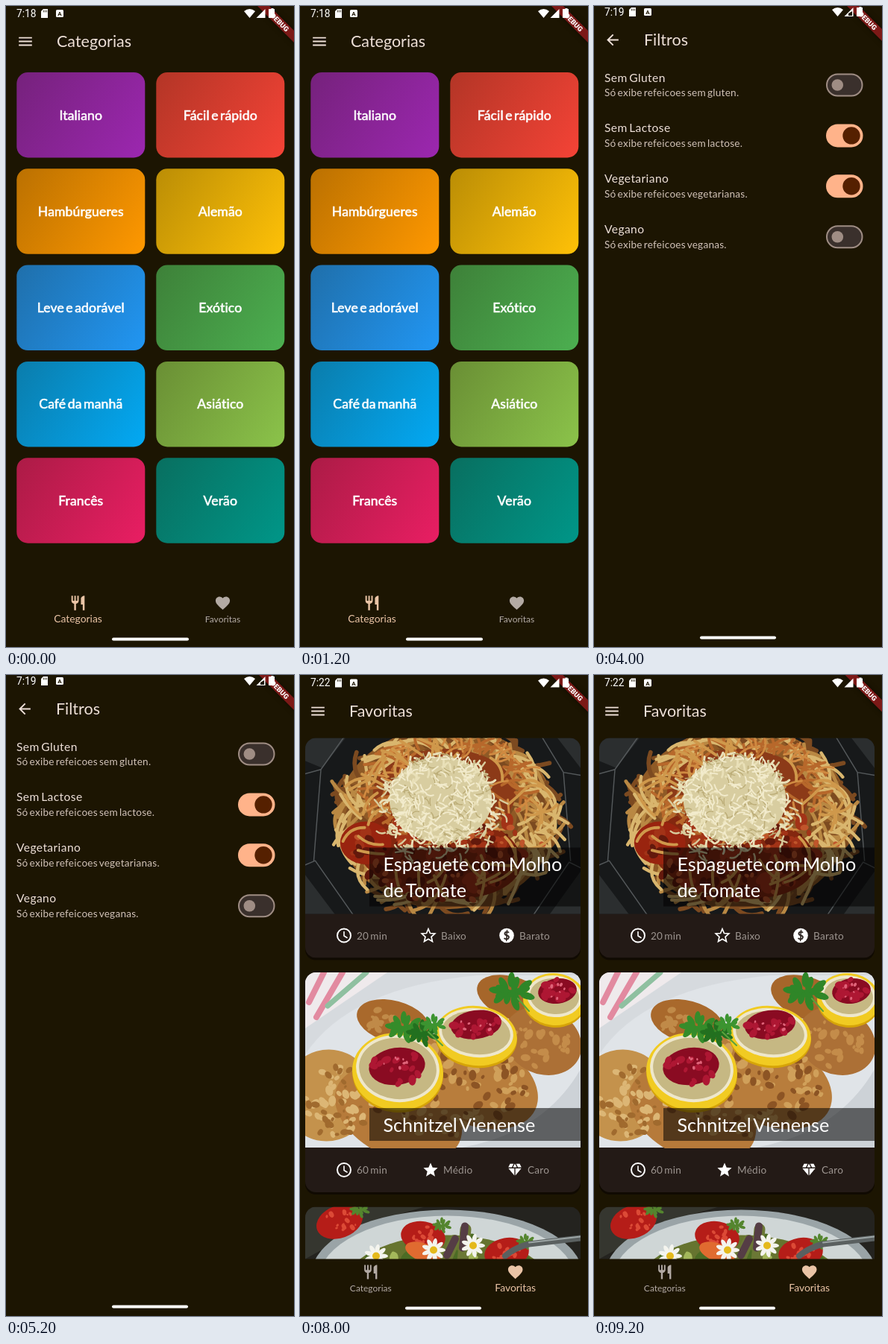
These frames come from a looping animation (386 by 860 pixels, 10 s). An HTML page:

```html
<!DOCTYPE html>
<html lang="pt">
<head>
<meta charset="utf-8">
<title>Receitas</title>
<style>
html, body { margin: 0; width: 100%; height: 100%; overflow: hidden; background: #1c1502; }
svg { display: block; }
#stage { width: 386px; height: 860px; font-family: Lato, sans-serif; }
#stage text { word-spacing: -.12em; }
.banner { filter: drop-shadow(0 0 3px rgba(0, 0, 0, .5)); }
.screen { visibility: hidden; animation: turn 10s step-end infinite; }
@keyframes turn {
  0% { visibility: visible; }
  20%, 100% { visibility: hidden; }
}
</style>
</head>
<body>
<svg id="stage" viewBox="0 0 386 860"></svg>
<script>
const BG = '#1c1502', INK = '#eee0d8', PEACH = '#ffb48e', GREY = '#9d9590';

const ICON = {
  menu: 'M3 18h18v-2H3zM3 13h18v-2H3zM3 6v2h18V6z',
  back: 'M20 11H7.8l5.6-5.6L12 4l-8 8 8 8 1.4-1.4L7.8 13H20z',
  food: 'M11 9H9V2H7v7H5V2H3v7c0 2.1 1.7 3.8 3.75 4v9h2.5v-9C11.3 12.8 13 11.1 13 9V2h-2zM16 6v8h2.5v8H21V2c-2.8 0-5 2.2-5 4z',
  heart: 'M12 21.35l-1.45-1.3C5.4 15.4 2 12.3 2 8.5 2 5.4 4.4 3 7.5 3c1.7 0 3.4.8 4.5 2.1C13.1 3.8 14.8 3 16.5 3 19.6 3 22 5.4 22 8.5c0 3.8-3.4 6.9-8.55 11.5z',
  star: 'M12 17.3 18.2 21l-1.65-7L22 9.2l-7.2-.6L12 2 9.2 8.6 2 9.2 7.45 14 5.8 21z',
  gem: 'M12.16 3h-.32L9.2 8.25h5.6zM16.46 8.25h5.16L19 3h-5.16zM21.4 9.75h-8.65V20.1zM11.25 20.1V9.75H2.6zM7.54 8.25 10.16 3H5L2.38 8.25z'
};

// Small drawing helpers
function text(x, y, s, size, fill = INK, { ls = 0, mid, bold, more = '' } = {}) {
  const heavy = bold ? ` stroke="${fill}" stroke-width=".6"` : '';
  return `<text x="${x}" y="${y}" font-size="${size}" fill="${fill}" style="letter-spacing:${ls}px"${mid ? ' text-anchor="middle"' : ''}${heavy} ${more}>${s}</text>`;
}
const rect = (x, y, w, h, fill, r = 0) =>
  `<rect x="${x}" y="${y}" width="${w}" height="${h}" rx="${r}" fill="${fill}"/>`;
const oval = (x, y, rx, ry, fill, turn = 0) =>
  `<ellipse rx="${rx}" ry="${ry}" fill="${fill}" transform="translate(${x} ${y}) rotate(${turn})"/>`;
const path = (d, fill) => `<path d="${d}" fill="${fill}"/>`;
const line = (d, color, w) =>
  `<path d="${d}" fill="none" stroke="${color}" stroke-width="${w}" stroke-linecap="round" stroke-linejoin="round"/>`;
const at = (x, y, body, more = '') => `<g transform="translate(${x} ${y})" ${more}>${body}</g>`;
const icon = (name, x, y, fill = INK, size = 24) =>
  at(x, y, `<path d="${ICON[name]}" fill="${fill}" transform="scale(${size / 24}) translate(-12 -12)"/>`);
const repeat = (n, f) => Array.from({ length: n }, (_, i) => f(i)).join('');

function random(seed) {
  return () => (seed = (seed * 16807) % 2147483647) / 2147483647;
}

// Scatter short bent strands inside an elliptical ring
function strands(rnd, n, cx, cy, rx, ry, inner, len, color, w, spread = 1.8) {
  const d = repeat(n, () => {
    const a = rnd() * 6.283, r = inner + (1 - inner) * Math.sqrt(rnd());
    const x = cx + rx * r * Math.cos(a), y = cy + ry * r * Math.sin(a);
    const b = a + 1.57 + (rnd() - .5) * spread, dx = len * Math.cos(b), dy = len * Math.sin(b);
    const k = rnd() * .8;
    return `M${(x - dx).toFixed(1)} ${(y - dy).toFixed(1)}Q${(x + dy * k).toFixed(1)} ${(y - dx * k).toFixed(1)} ${(x + dx).toFixed(1)} ${(y + dy).toFixed(1)}`;
  });
  return line(d, color, w);
}
function specks(rnd, n, cx, cy, rx, ry, size, fill) {
  return repeat(n, () => {
    const a = rnd() * 6.283, r = Math.sqrt(rnd()), s = size * (.5 + rnd());
    return oval(cx + rx * r * Math.cos(a), cy + ry * r * Math.sin(a), s, s * .7, fill, rnd() * 180);
  });
}

// Dishes
function pasta() {
  const rnd = random(41);
  return rect(0, 0, 386, 283, '#17191a') +
    path('M0 0H70L24 60 0 50zM386 60 340 0H386zM0 210 55 283H0zM386 205 330 283H386z', '#2b2e2f') +
    line('M0 68 22 62 66 0M22 62 12 190M0 196 14 190 70 270M386 70 362 66 322 0M362 66 372 190M386 200 370 192 316 272', '#54585a', 1.5) +
    oval(198, 130, 154, 128, '#8f5a26') +
    strands(rnd, 90, 198, 130, 156, 128, .55, 22, '#7c4a20', 6, 2.6) +
    strands(rnd, 90, 198, 130, 150, 126, .5, 24, '#b98843', 5, 2.6) +
    strands(rnd, 85, 198, 130, 156, 130, .6, 22, '#d9b66e', 4.5, 2.4) +
    oval(188, 180, 116, 62, '#84270f', 8) + oval(195, 95, 100, 62, '#8c3a18') +
    strands(rnd, 70, 198, 85, 120, 75, .5, 16, '#b7682b', 4, 4) +
    strands(rnd, 40, 198, 85, 125, 75, .5, 14, '#d08a41', 3, 4) +
    oval(85, 165, 36, 30, '#99240f') +
    specks(rnd, 70, 188, 175, 130, 70, 8, '#a23317') +
    specks(rnd, 75, 188, 182, 120, 68, 6, '#63190c') +
    specks(rnd, 45, 200, 172, 140, 75, 4, '#c0552b') +
    strands(rnd, 45, 198, 130, 140, 110, .6, 18, '#cf984b', 4, 3) +
    strands(rnd, 70, 190, 118, 92, 80, .5, 6, '#d8cb9c', 2.5, 6.3) +
    oval(190, 104, 72, 60, '#d8cda0') +
    strands(rnd, 110, 190, 108, 82, 70, .3, 5, '#e9e0b8', 3, 6.3) +
    strands(rnd, 100, 190, 106, 76, 66, 0, 5, '#bcad78', 1.5, 6.3) +
    strands(rnd, 170, 190, 103, 74, 62, 0, 5, '#f2ebcc', 2, 6.3);
}

// A sprig of small pointed leaves
function parsley(x, y, s, fill = '#2f7a2c') {
  return repeat(14, i => {
    const r = s * (.3 + .4 * (i % 3) / 2), a = i * 2.4;
    return oval(x + r * Math.cos(a), y + r * .65 * Math.sin(a), s * .28, s * .13, fill, i * 137);
  });
}

function toast() {
  const rnd = random(9);
  const berries = [[108,84],[135,83],[144,88],[170,90],[188,70],[190,94],[222,51],[222,75],[222,95],[249,86],[264,57],[282,38],[294,69],[312,64],[275,80],[207,92],[246,50]];
  return rect(0, 0, 369, 235, '#e6e4e8') + path('M0 0H260L0 62z', '#dddad2') +
    path('M205 110Q270 190 369 150V185Q290 190 210 150z', '#c58a7c') +
    path('M225 150Q300 190 369 168V184Q290 194 225 165z', '#d8b36b') +
    oval(295, 92, 106, 72, '#e6d198', -8) + oval(298, 76, 96, 62, '#f1e4b9', -8) +
    oval(310, 65, 56, 36, '#f6edcd', -8) +
    path('M-10 150Q20 90 95 82Q190 80 240 155Q260 235 220 240H-10z', '#e4cd8c') +
    path('M-10 140Q30 85 110 84Q190 85 228 150Q230 200 170 210Q60 235 -10 195z', '#f1e5ba') +
    oval(100, 125, 55, 26, '#eed38a', 5) + oval(102, 123, 34, 15, '#f5e4a9', 5) +
    specks(rnd, 13, 160, 120, 60, 28, 7, '#e4c172') + specks(rnd, 9, 60, 190, 70, 24, 7, '#dfc684') +
    specks(rnd, 8, 320, 40, 40, 26, 5, '#e9d08a') +
    parsley(65, 68, 36, '#23541f') + parsley(96, 62, 34, '#2f6b25') + parsley(120, 46, 32, '#2a6222') + parsley(138, 62, 28, '#1d4a1c') +
    line('M105 72Q180 84 225 66T310 36', '#97a33c', 3) +
    berries.map(([x, y]) => oval(x, y, 15, 15, '#6d0713') + oval(x - 1, y - 1, 12.5, 12.5, '#980f1f') + oval(x - 4, y - 5, 3, 3, '#d2606a')).join('');
}

function burger() {
  const rnd = random(23);
  return rect(0, 0, 369, 235, '#ccd0d6') +
    path('M8 110C0 50 60 10 130 3C190 5 215 45 206 100L120 150H20z', '#c98750') +
    path('M14 80C30 35 70 12 125 8C180 10 200 40 198 72C130 60 50 70 14 100z', '#dda268') +
    path('M208 75C205 30 240 -15 300 -15C350 -15 372 20 369 70V120Q280 150 210 100z', '#d1925c') +
    path('M220 58C225 20 260 -12 300 -12C340 -10 362 15 362 50Q290 20 220 58z', '#e0a66f') +
    path('M12 118Q95 68 190 75L240 90 369 112V160H12z', '#4d1b16') +
    oval(60, 128, 62, 16, '#dcbd92', -20) + oval(318, 125, 58, 14, '#c08a58', 12) +
    specks(rnd, 28, 185, 115, 115, 40, 13, '#82281f') + specks(rnd, 35, 180, 115, 115, 38, 10, '#231010') +
    specks(rnd, 22, 200, 125, 105, 28, 6, '#b0604a') +
    path('M70 122Q90 78 125 76L118 98Q92 105 80 128z', '#6f8f35') + line('M82 115Q100 90 120 84', '#344c18', 4) +
    oval(190, 96, 28, 28, '#34481a') + oval(190, 95, 22, 21, '#99a64f') + oval(190, 94, 14, 12, '#5d5028') +
    specks(rnd, 7, 190, 95, 10, 9, 3, '#d8cd8e');
}

function schnitzel() {
  const rnd = random(77);
  const slice = (x, y, rx, ry, jx, jy) =>
    oval(x, y + 3, rx, ry, '#d6a408', 6) + oval(x, y, rx, ry, '#f1cb22', 6) + oval(x, y - 4, rx - 5, ry - 7, '#eee7cb', 6) +
    oval(x, y - 4, rx - 9, ry - 11, '#c6b883', 6) +
    oval(jx, jy, rx * .62, ry * .48, '#8a0b22', -8) + specks(rnd, 14, jx, jy, rx * .55, ry * .45, 6, '#ae1733') + specks(rnd, 8, jx, jy, rx * .4, ry * .3, 2, '#e0647a');
  return rect(0, 0, 369, 235, '#d6dade') + path('M0 0H110L0 75z', '#efeaec') +
    line('M25 0 5 40M50 0 15 60', '#e28aa0', 8) + line('M82 0 30 45', '#8fc0a0', 7) +
    path('M0 110Q60 20 230 4H369V235H0z', '#e0e4e8') +
    oval(30, 165, 60, 62, '#c4924c', 30) + oval(118, 66, 50, 28, '#a9692c', 15) + oval(125, 190, 90, 58, '#b67a3a', 25) +
    oval(225, 145, 92, 58, '#b87d3c', 25) + oval(280, 35, 52, 28, '#a6662a', 20) + oval(318, 92, 54, 44, '#ac7036', 25) +
    specks(rnd, 60, 190, 150, 110, 70, 6, '#d0a05a') + specks(rnd, 60, 190, 155, 105, 65, 5, '#8c5424') +
    specks(rnd, 35, 45, 175, 45, 48, 5, '#dcb675') + specks(rnd, 25, 45, 175, 45, 48, 4, '#a06a2e') +
    specks(rnd, 25, 318, 95, 44, 34, 5, '#c48c4a') + specks(rnd, 15, 110, 64, 36, 18, 5, '#c08a48') +
    path('M210 235Q320 215 369 130V235z', '#cdd2d7') +
    slice(334, 36, 42, 35, 338, 25) + slice(229, 85, 55, 40, 229, 70) + slice(124, 133, 61, 52, 123, 126) +
    parsley(130, 74, 30, '#358c2a') + parsley(155, 82, 26, '#22701f') + parsley(170, 70, 20, '#3c9430') + parsley(274, 26, 36, '#2f8628') +
    line('M165 80 184 98M285 35 300 52', '#5ba33c', 2);
}

function salad() {
  const rnd = random(58);
  const daisy = (x, y) => repeat(9, i => oval(x + 9 * Math.cos(i * .7), y + 9 * Math.sin(i * .7), 7, 3, '#f4f4ee', i * 40)) + oval(x, y, 5, 5, '#e4b91c');
  const berry = (x, y, s, turn) => oval(x, y, s, s * .68, '#b51d18', turn) + specks(rnd, 14, x, y, s * .7, s * .45, 3, '#dc4a36') + parsley(x + s * .8, y - s * .5, s * .5, '#54852e');
  return rect(0, 0, 369, 235, '#24231f') + path('M0 0H160L90 20 0 70z', '#35362f') +
    oval(190, 92, 182, 88, '#9aa4a7') + oval(190, 98, 172, 86, '#cfd6d6') + oval(190, 110, 140, 72, '#66742f') +
    specks(rnd, 45, 190, 85, 125, 40, 9, '#4c6c25') + specks(rnd, 32, 190, 80, 120, 32, 6, '#a4b85b') +
    berry(46, 20, 32, -20) + berry(158, 40, 30, 10) + berry(270, 62, 30, -10) + oval(158, 61, 25, 12, '#e06b30', 20) +
    line('M210 85 215 30M185 80 200 45', '#6b7835', 15) + line('M211 55 214 26M190 65 201 43', '#553d45', 10) +
    daisy(95, 66) + daisy(172, 58) + daisy(225, 52) +
    line('M369 42 300 50Q280 55 268 66', '#5a6060', 8) + line('M369 40 300 48', '#9ca5a5', 2);
}

// Shared screen parts
function status(time, y, weak) {
  const roboto = 'font-family="Roboto, sans-serif"';
  return at(0, y - 8, path('M331-8H347L396 41V57z', '#7c1917') +
      text(0, 3.4, 'DEBUG', 9.4, '#fff', { mid: 1, more: roboto + ' font-weight="900" transform="translate(367 20) rotate(45)"' }), 'class="banner"') +
    text(14, y + 4.8, time, 13.8, '#fff', { more: roboto }) +
    at(0, y, path('M50-6H56V6H47V-3z', '#fff') + line('M50.5-4v2M52.5-4v2M54.5-4v2', BG, .8) +
      rect(67, -5, 10, 10, '#fff', 1.5) +
      text(72, 3, 'A', 8, BG, { mid: 1, more: roboto + ' font-weight="700"' }) +
      path('M319-3Q326.5-9 334-3L326.5 6z', '#fff') + path('M347.5-6V6H335.5z', '#fff') +
      (weak ? path('M346-1V5H341V2z', BG) : '') +
      path('M354-6H355.5V-7H358.5V-6H360V6H352V-6z', '#fff'));
}
const head = (ic, x, y, title, size = 21.5) => icon(ic, x, y, INK, 23.5) + text(x + 42, y + 7.5, title, size);
const pill = (x, y, w, fill = '#fff') => rect(x, y - 2, w, 4, fill, 2);

function nav(x1, x2, on) {
  const tab = (name, label, x, lit) => icon(name, x, 801, lit ? '#eac4a6' : '#b3aaa4', lit ? 23.5 : 23) +
    text(x, 827, label, lit ? 13.9 : 12, lit ? '#eac4a6' : '#b3aaa4', { mid: 1 });
  return tab('food', 'Categorias', x1, on === 0) + tab('heart', 'Favoritas', x2, on === 1);
}

const clock = at(52, 265, '<circle r="9" fill="none" stroke="#fff" stroke-width="2"/>' + line('M0-5V.5L4 3', '#fff', 1.6));
const coin = at(270, 265, '<circle r="9.8" fill="#fff"/>' + text(0, 5, '$', 14.5, '#231a16', { mid: 1, bold: 1 }));

function meal(x, y, photo, lines, facts, hard) {
  const top = lines.length > 1 ? 147 : 182;
  const label = (s, tx) => text(tx, 270, s, 13.6, GREY, { ls: .24 });
  const body = rect(0, 0, 369, 295, '#231a16') +
    `<svg width="369" height="236" overflow="hidden">${photo}</svg>` +
    (lines.length ? rect(86, top, 283, 226 - top, 'rgba(0,0,0,.54)') : '') +
    lines.map((s, i) => text(104.5, 213.5 - 35 * (lines.length - 1 - i), s, 25.2, '#fff')).join('') +
    (facts ? clock + label(facts[0], 69) +
      (hard ? icon('star', 168, 265, '#fff', 23) + icon('gem', 281, 265, '#fff', 22)
            : at(165, 265, `<path d="${ICON.star}" transform="scale(.88) translate(-12 -12)" fill="none" stroke="#fff" stroke-width="1.9"/>`) + coin) +
      label(facts[1], hard ? 185 : 182) + label(facts[2], hard ? 298 : 287) : '');
  return rect(x, y + 3, 369, 295, '#100a02', 14) + at(x, y, body, 'clip-path="url(#card)"');
}

// Screens
const tiles = [['Italiano', '9c27b0'], ['Fácil e rápido', 'f44336'], ['Hambúrgueres', 'ff9800'], ['Alemão', 'ffc107'],
  ['Leve e adorável', '2196f3'], ['Exótico', '4caf50'], ['Café da manhã', '03a9f4'], ['Asiático', '8bc34a'],
  ['Francês', 'e91e63'], ['Verão', '009688']];

const fade = tiles.map(([, c], i) =>
  `<linearGradient id="g${i}" gradientUnits="userSpaceOnUse" x2="172" y2="114.5"><stop stop-color="#${c}" stop-opacity=".7"/><stop offset="1" stop-color="#${c}"/></linearGradient>`).join('');

const home = () => status('7:18', 10) + head('menu', 26, 47.5, 'Categorias') +
  tiles.map(([name], i) => at(14.3 + i % 2 * 187, 89 + (i >> 1) * 129.3,
    rect(0, 0, 172, 114.5, `url(#g${i})`, 15) + text(86, 63.5, name, 17.6, '#fff', { ls: .12, mid: 1, bold: 1 }))).join('') +
  nav(96.5, 290.5, 0) + pill(142, 849.5, 103);

const dish = '<use href="#pasta" transform="translate(0 -17) scale(.956)"/>';
const spaghetti = (x, y) => meal(x, y, dish, ['Espaguete com Molho', 'de Tomate'], ['20 min', 'Baixo', 'Barato']);

const quick = () => status('7:19', 8, true) + head('back', 25, 45.5, 'Fácil e rápido') + spaghetti(8, 81.5) +
  meal(8, 395.5, toast(), ['Torrada Havaiana'], ['10 min', 'Baixo', 'Barato']) +
  meal(8, 710, burger(), []) + rect(0, 857, 386, 3, '#0d0a02') + pill(142, 845.5, 101);

function filters() {
  const rows = [['Sem Gluten', 'sem gluten', 0], ['Sem Lactose', 'sem lactose', 1], ['Vegetariano', 'vegetarianas', 1], ['Vegano', 'veganas', 0]];
  return status('7:19', 8, true) + head('back', 25, 45.5, 'Filtros') + rows.map(([name, what, on], i) =>
    at(0, 106 + i * 67.9, text(14, -4.5, name, 15.6, INK, { ls: .4 }) +
      text(14, 15, `Só exibe refeicoes ${what}.`, 13.6, '#d2c3b9', { ls: .24 }) +
      (on ? rect(311, -15.5, 49.5, 31, '#ffb38a', 15.5) + oval(345, 0, 11.7, 11.7, '#552000')
          : `<rect x="312" y="-14.5" width="47.5" height="29" rx="14.5" fill="#3a302c" stroke="#9f8d84" stroke-width="2"/>` + oval(326.3, 0, 7.8, 7.8, '#9f8d84')))).join('') +
    pill(142, 847.5, 102);
}

function recipe() {
  const items = ['4 Tomates', '1 Colher de sopa de Azeite de Oliva', '1 Cebola', '250g de Espaguete', 'Temperos', 'Queijo (opcional)'];
  const steps = [[652, 'Corte os tomates e a cebola em pedaços pequenos.'], [686, 'Ferva um pouco de água - adicione sal assim que ferver.'],
    [720, 'Coloque o espaguete na água fervente - deve ficar pronto em'], [739, 'cerca de 10 a 12 minutos.'],
    [773, 'Enquanto isso, aqueça um pouco de azeite e adicione a cebola'], [792, 'picada.']];
  const row = (y, s) => text(192.7, y, s, 13.6, INK, { ls: .24, mid: 1 });
  const title = (y, s) => text(192.7, y, s, 21.3, PEACH, { mid: 1, bold: 1 });
  return status('7:22', 10) + head('back', 25, 47.5, 'Espaguete com Molho de T…', 21.1) + icon('heart', 364, 48, '#d9cfc7', 23.5) +
    `<svg y="74" width="386" height="283" overflow="hidden"><use href="#pasta"/></svg>` +
    title(391, 'Ingredientes') + items.map((s, i) => row(427.5 + i * 26.4, s)).join('') +
    title(611.5, 'Modo de Preparo') + steps.map(s => row(...s)).join('') +
    rect(0, 793, 386, 67, '#f0dfd7') + text(21.5, 820, 'Adicionado aos favoritos', 13.6, '#534640', { ls: .24 }) +
    pill(142, 849.5, 102, '#5f5752');
}

const liked = () => status('7:22', 10.5) + head('menu', 24, 48.5, 'Favoritas') + spaghetti(7, 84.5) +
  meal(7, 399, schnitzel(), ['Schnitzel Vienense'], ['60 min', 'Médio', 'Caro'], true) +
  meal(7, 713.5, salad(), []) + rect(0, 783.5, 386, 76.5, BG) + nav(94.8, 288.7, 1) + pill(141, 849.5, 102);

document.getElementById('stage').innerHTML =
  `<defs>${fade}<clipPath id="card"><rect width="369" height="295" rx="14.5"/></clipPath><g id="pasta">${pasta()}</g></defs>` +
  rect(0, 0, 386, 860, BG) +
  [home, quick, filters, recipe, liked].map((draw, i) =>
    `<g class="screen" style="animation-delay:${i * 2 - 10}s">${draw()}</g>`).join('');
</script>
</body>
</html>
```
